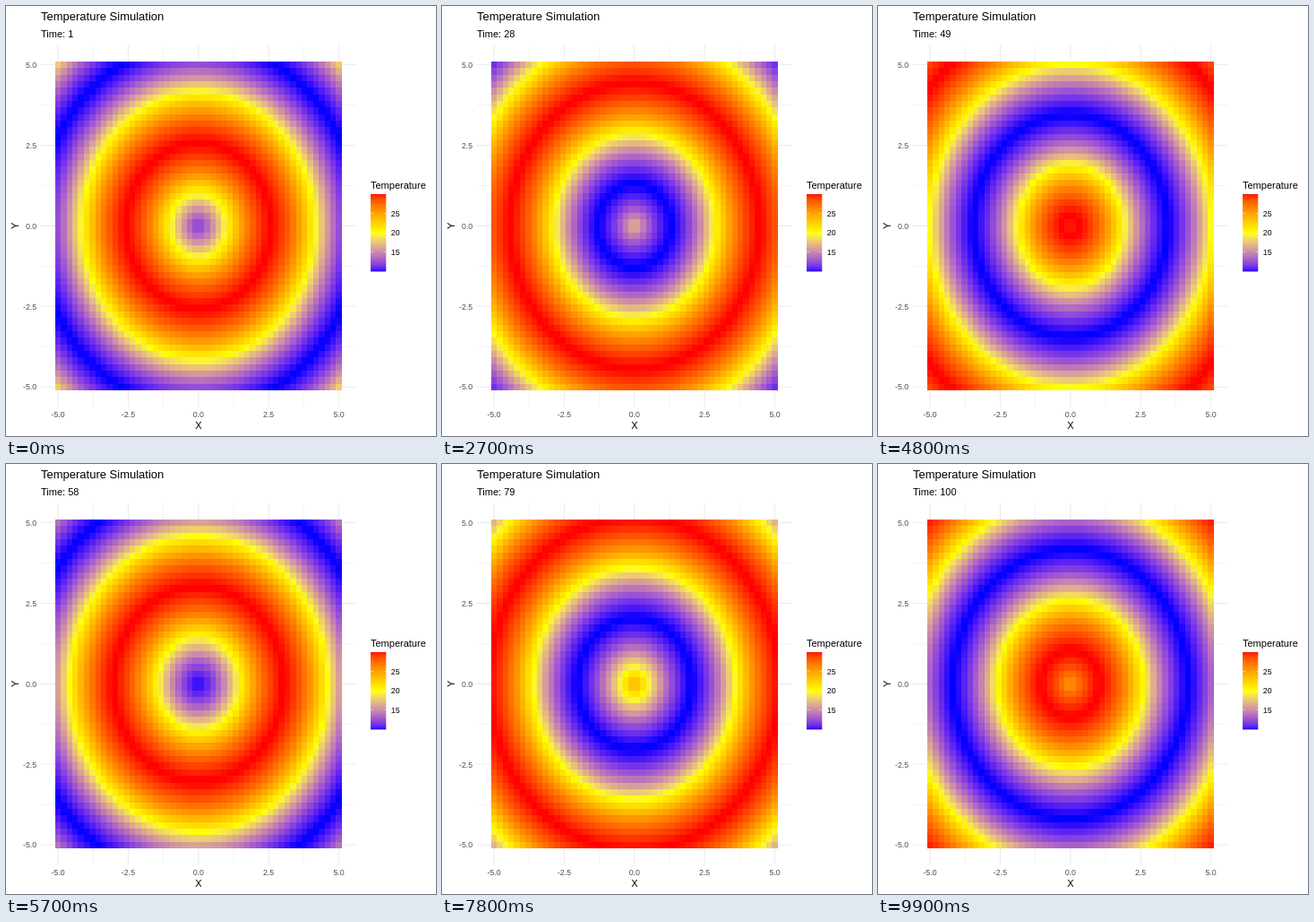
These frames come from a looping animation (480x480 px, 10000 ms). An HTML page with a canvas:

```html
<!DOCTYPE html>
<html lang="en">
<head>
<meta charset="utf-8">
<title>Temperature Simulation</title>
<style>
  html, body { margin: 0; width: 100%; height: 100%; overflow: hidden; background: #fff; }
  svg, canvas { position: absolute; left: 0; top: 0; }
  text { font: 11px "Liberation Sans", Arial, sans-serif; }
  .title { font-size: 13px; }
  .axis, .key { font-size: 8.8px; }
  .axis { fill: #4d4d4d; }
  .mid { text-anchor: middle; }
  .end { text-anchor: end; }
  line { stroke: #ebebeb; }
</style>
</head>
<body>
<svg id="plot" width="480" height="480">
  <text class="title" x="39" y="15.5">Temperature Simulation</text>
  <text id="time" x="39" y="35">Time: 1</text>
  <text class="mid" x="214.8" y="472">X</text>
  <text class="mid" transform="translate(13.5 245.4) rotate(-90)">Y</text>
  <text x="407" y="203.5">Temperature</text>
</svg>
<canvas id="heat" width="480" height="480"></canvas>
<script>
const plot = document.getElementById('plot');
const time = document.getElementById('time');
const ctx = document.getElementById('heat').getContext('2d');

// Panel geometry: origin, pixels per unit, half extent in units
const CX = 214.8, CY = 245.4, UX = 31.34, UY = 35.97, HALF = 5.612;
const N = 50, STEP = 10 / (N - 1);
const BAR = { x: 407, y: 210, w: 17.3, h: 86.4 };

// Colour scale blended in CIE Lab
const BLUE = [32.3, 79.19, -107.86], YELLOW = [97.14, -21.55, 94.48], RED = [53.24, 80.09, 67.2];

function labToCss([L, a, b]) {
  const inv = f => f ** 3 > 0.008856 ? f ** 3 : (f - 16 / 116) / 7.787;
  const fy = (L + 16) / 116;
  const x = 0.95047 * inv(fy + a / 500), y = inv(fy), z = 1.08883 * inv(fy - b / 200);
  const rgb = [
    3.2406 * x - 1.5372 * y - 0.4986 * z,
    -0.9689 * x + 1.8758 * y + 0.0415 * z,
    0.0557 * x - 0.204 * y + 1.057 * z
  ].map(c => {
    const v = c > 0.0031308 ? 1.055 * c ** (1 / 2.4) - 0.055 : 12.92 * c;
    return Math.round(255 * Math.min(1, Math.max(0, v)));
  });
  return `rgb(${rgb})`;
}

// v runs from -1 (cold) to 1 (hot)
function colour(v) {
  const end = v < 0 ? BLUE : RED, k = Math.abs(v);
  return labToCss(YELLOW.map((c, i) => c + (end[i] - c) * k));
}

function add(name, attrs, text = '') {
  const el = document.createElementNS('http://www.w3.org/2000/svg', name);
  for (const k in attrs) el.setAttribute(k, attrs[k]);
  el.textContent = text;
  plot.append(el);
}

function gridLines(v, width) {
  const x = CX + v * UX, y = CY - v * UY;
  add('line', { x1: x, x2: x, y1: CY - HALF * UY, y2: CY + HALF * UY, 'stroke-width': width });
  add('line', { x1: CX - HALF * UX, x2: CX + HALF * UX, y1: y, y2: y, 'stroke-width': width });
}

for (const v of [-3.75, -1.25, 1.25, 3.75]) gridLines(v, 0.53);
for (const v of [-5, -2.5, 0, 2.5, 5]) {
  gridLines(v, 1.07);
  add('text', { class: 'axis mid', x: CX + v * UX, y: 458.5 }, v.toFixed(1));
  add('text', { class: 'axis end', x: 34.2, y: CY - v * UY + 3.2 }, v.toFixed(1));
}

function drawLegend() {
  for (let y = 0; y < BAR.h; y++) {
    ctx.fillStyle = colour(Math.max(-1, 1 - 2 * (y + 0.5) / BAR.h));
    ctx.fillRect(BAR.x, BAR.y + y, BAR.w, Math.min(1, BAR.h - y));
  }
  ctx.fillStyle = '#fff';
  for (const t of [25, 20, 15]) {
    const y = BAR.y + BAR.h * (30 - t) / 20, len = BAR.w / 5;
    ctx.fillRect(BAR.x, y - 0.19, len, 0.38);
    ctx.fillRect(BAR.x + BAR.w - len, y - 0.19, len, 0.38);
    add('text', { class: 'key', x: 429.8, y: y + 3.2 }, t);
  }
}

function drawHeat(t) {
  const edge = (i, c, u) => Math.round(c + (i - N / 2) * STEP * u);
  for (let i = 0; i < N; i++) {
    const x0 = edge(i, CX, UX), x1 = edge(i + 1, CX, UX);
    for (let j = 0; j < N; j++) {
      const y0 = edge(j, CY, UY), y1 = edge(j + 1, CY, UY);
      const r = Math.hypot(i * STEP - 5, j * STEP - 5);
      ctx.fillStyle = colour(Math.sin(r - t));
      ctx.fillRect(x0, y0, x1 - x0, y1 - y0);
    }
  }
}

let shown = 0;
function tick() {
  const t = Math.floor(performance.now() / 100) % 100 + 1;
  if (t !== shown) {
    shown = t;
    time.textContent = 'Time: ' + t;
    drawHeat(t);
  }
  requestAnimationFrame(tick);
}

drawLegend();
tick();
</script>
</body>
</html>
```
